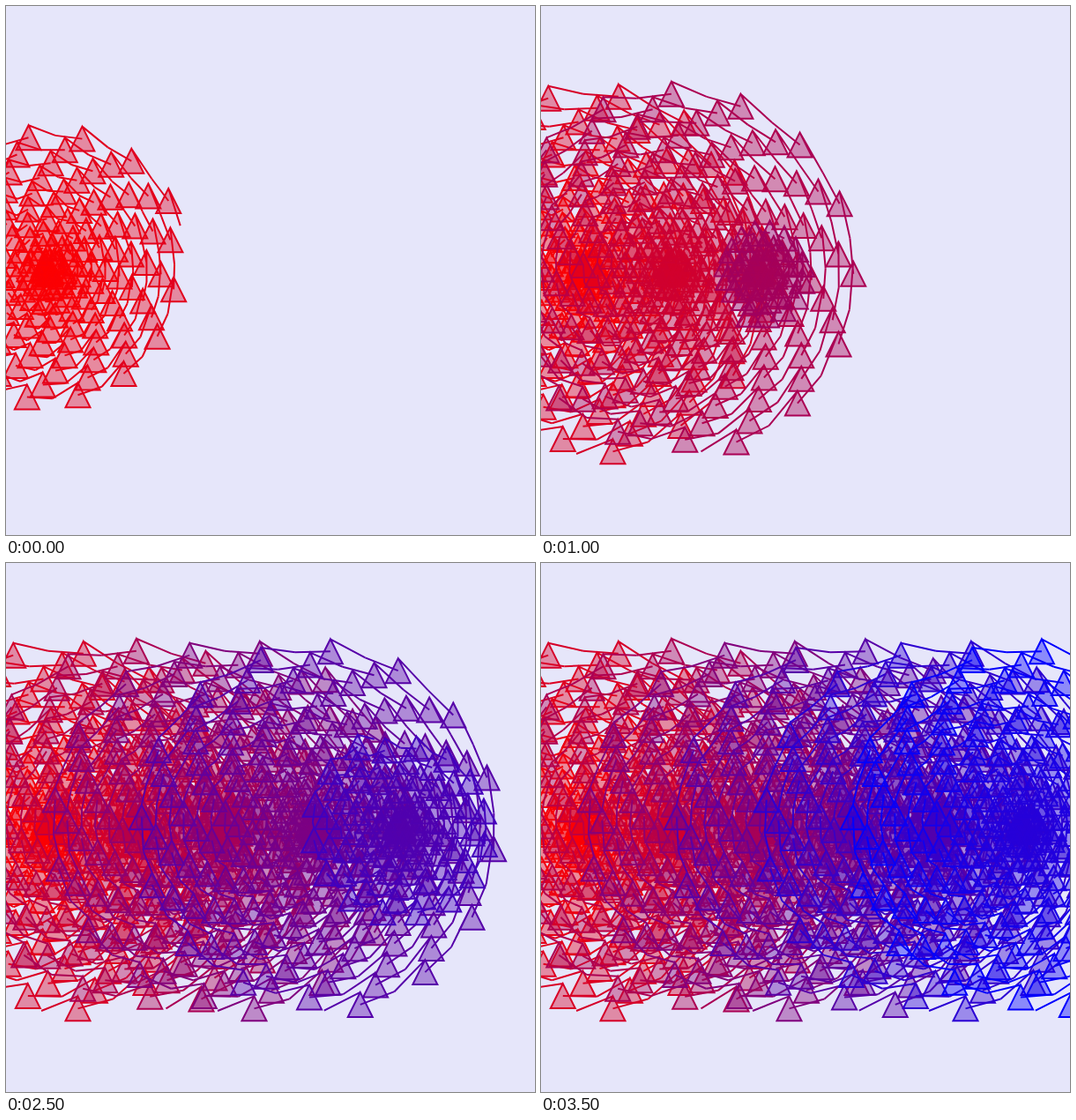
Write an HTML page that moves like this. It is 600 px wide and 600 px high and loops after 4000 ms.

```html
<!DOCTYPE html>
<html lang="en">
<head>
<meta charset="utf-8">
<title>Spirals</title>
<style>
  html, body { margin: 0; width: 100%; height: 100%; overflow: hidden; background: #e6e6fa; }
  svg { display: block; width: 100vw; height: 100vh; }
  path { stroke-width: 2; fill-opacity: .4; }
</style>
</head>
<body>
<svg id="stage" viewBox="0 0 600 600"></svg>
<script>
const NS = 'http://www.w3.org/2000/svg';
const LOOP = 4000, STEPS = 8;
const PER_SPIRAL = 208, TOTAL = 1250, SIZE = 14;
const starts = [.3, .1, .3, .2, .3, .2];   // first angle of each spiral, in radians

const stage = document.getElementById('stage');

function add(parent, tag, attrs = {}) {
  const el = document.createElementNS(NS, tag);
  for (const key in attrs) el.setAttribute(key, attrs[key]);
  return parent.appendChild(el);
}

// Archimedean spiral around (cx, 300)
function point(cx, angle) {
  const r = 2.5 * angle;
  return [cx + r * Math.cos(angle), 300 + r * Math.sin(angle)];
}

const fmt = p => p.map(v => v.toFixed(2)).join(' ');

function addMark(group, i) {
  const s = Math.floor(i / PER_SPIRAL), k = i % PER_SPIRAL;
  const cx = 50 + 100 * s, angle = starts[s] + .4 * k;
  const [x, y] = point(cx, angle);
  const apex = fmt([x, y - SIZE]);
  const tri = `M${apex}L${fmt([x + SIZE, y + SIZE])} ${fmt([x - SIZE, y + SIZE])}Z`;
  const lead = k ? `M${fmt(point(cx, angle - .2))}L${fmt([x, y])}` : '';
  const tail = `M${apex}L${fmt(point(cx, angle + .2))}`;
  const mix = Math.round(255 * i / TOTAL);
  const color = `rgb(${255 - mix},0,${mix})`;
  add(group, 'path', { d: lead + tri + tail, fill: color, stroke: color });
}

const last = starts.length * PER_SPIRAL;
const groups = [];
let next = 0;
for (let n = 1; n <= STEPS; n++) {
  const group = add(stage, 'g');
  const end = Math.min(last, Math.floor(TOTAL * n / STEPS));
  while (next < end) addMark(group, next++);
  groups.push(group);
}

let shown = -1;
function render(ms) {
  const step = Math.floor((ms % LOOP) / LOOP * STEPS);
  if (step === shown) return;
  shown = step;
  groups.forEach((g, n) => g.setAttribute('display', n <= step ? 'inline' : 'none'));
}

const begin = performance.now();
function tick() {
  render(performance.now() - begin);
  requestAnimationFrame(tick);
}
render(0);
requestAnimationFrame(tick);
</script>
</body>
</html>
```
